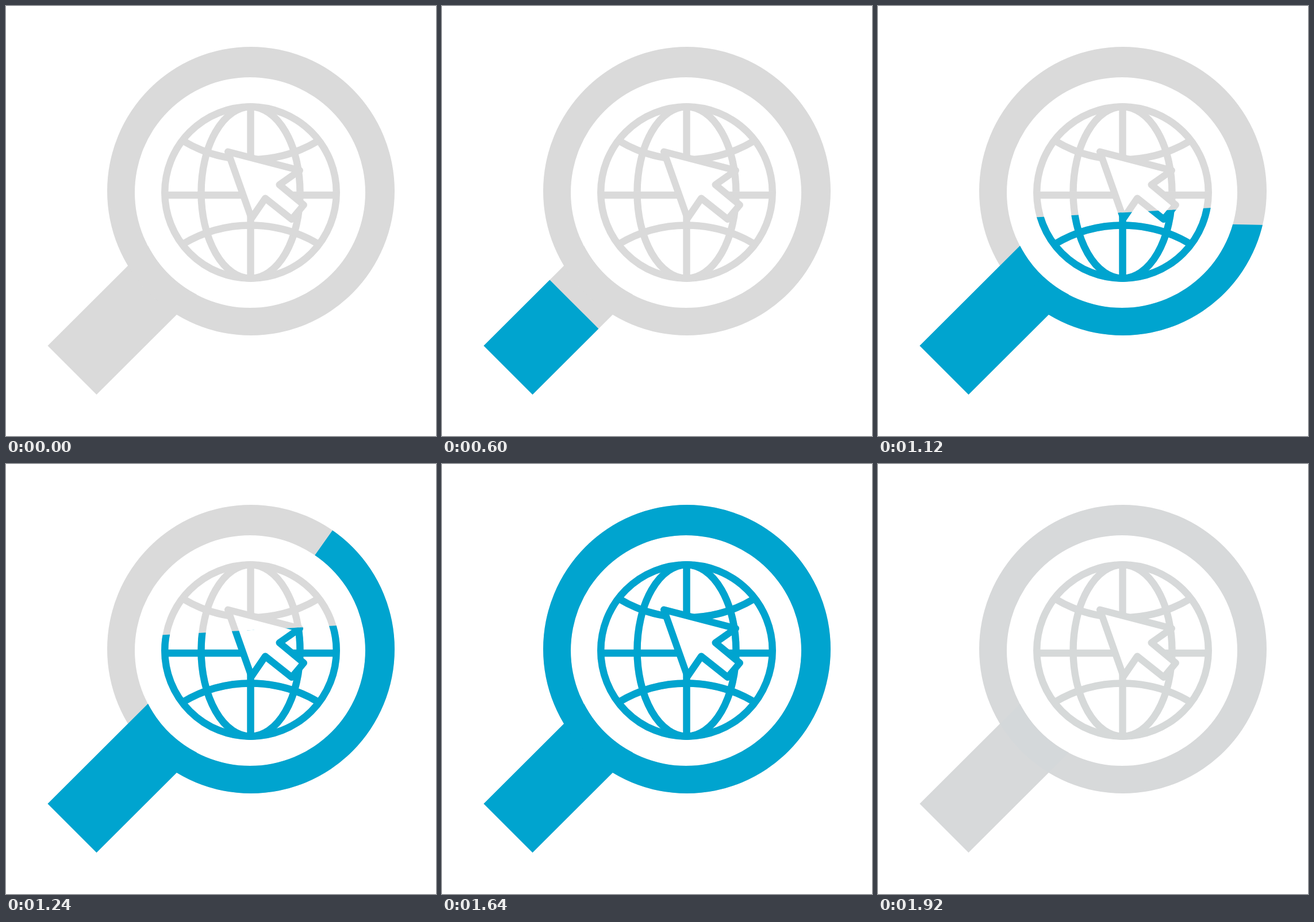
Animation, 748 px wide and 748 px high, one loop 2000 ms. Source, as an HTML page:

```html
<!DOCTYPE html>
<html lang="en">
<head>
<meta charset="utf-8">
<title>Web search</title>
<style>
  html, body { margin: 0; width: 100%; height: 100%; overflow: hidden; background: #fff; }
  svg { display: block; width: 100%; height: 100%; }
  .gray { color: #dadada; }
  .blue { color: #00a4cf; }
</style>
</head>
<body>
<svg viewBox="0 0 748 748">
  <defs>
    <path id="handle" fill="currentColor"
      d="M72.5 591L157.5 676L332 502A200.5 200.5 0 0 1 247 417Z"/>
    <path id="ring" fill="currentColor" fill-rule="evenodd"
      d="M176 322a250 251 0 0 1 500 0a250 251 0 0 1 -500 0Z
         M224 324.5a200.5 200.5 0 0 1 401 0a200.5 200.5 0 0 1 -401 0Z"/>
    <g id="globe" fill="none" stroke="currentColor" stroke-width="12.4">
      <circle cx="425.5" cy="324.5" r="149.3"/>
      <ellipse cx="425.5" cy="324.5" rx="86" ry="149.3"/>
      <path d="M425.5 175V474M276 329H575"/>
      <path d="M307 234A229 229 0 0 0 544 234M307 414.5A229 229 0 0 1 544 414.5"/>
      <path fill="#fff" stroke-width="12" stroke-linejoin="round"
        d="M386 253.5L511 286L475.5 310.8L518 346L497 371L451 334.5L427 369.5Z"/>
    </g>
    <clipPath id="handleClip"><polygon id="handleCut"/></clipPath>
    <clipPath id="ringClip"><polygon id="ringCut"/></clipPath>
    <clipPath id="globeClip"><polygon id="globeCut"/></clipPath>
  </defs>
  <g class="gray">
    <use href="#handle"/><use href="#ring"/><use href="#globe"/>
  </g>
  <g class="blue">
    <g class="fill" clip-path="url(#handleClip)"><use href="#handle"/></g>
    <g class="fill" clip-path="url(#ringClip)"><use href="#ring"/></g>
    <g class="fill" clip-path="url(#globeClip)"><use href="#globe"/></g>
  </g>
</svg>
<script>
const LOOP = 2000, STEP = 40;
const byId = id => document.getElementById(id);
const fills = document.querySelectorAll('.fill');
const clamp = x => Math.min(1, Math.max(0, x));
const span = (t, from, to) => clamp((t - from) / (to - from));
const easeInOut = p => p < 0.5 ? 2 * p * p : 1 - 2 * (1 - p) ** 2;

// Sweep angle of the ring in degrees over time, around a pivot inside the lens
const pivot = [384, 375];
const sweep = [[760, 135], [800, 114.3], [960, 49.4], [1120, 1.2], [1400, -129.2], [1555, -225]];

function sweepAngle(t) {
  let angle = sweep[0][1];
  for (let i = 1; i < sweep.length; i++) {
    const [t0, a0] = sweep[i - 1], [t1, a1] = sweep[i];
    if (t > t0) angle = a0 + (a1 - a0) * span(t, t0, t1);
  }
  return angle;
}

function setCut(id, points) {
  byId(id).setAttribute('points', points.map(p => p.join()).join(' '));
}

function cutHandle(t) {
  const d = 190 * easeInOut(span(t, 400, 760));
  setCut('handleCut', d ? [[62, 581], [167, 686], [167 + d, 686 - d], [62 + d, 581 - d]]
    .map(([x, y], i) => i < 2 ? [x - 10, y + 10] : [x, y]) : []);
}

function cutRing(t) {
  const start = sweep[0][1], end = sweepAngle(t);
  if (end >= start) return setCut('ringCut', []);
  if (end <= start - 360) return setCut('ringCut', [[0, 0], [748, 0], [748, 748], [0, 748]]);
  const points = [pivot], n = Math.ceil((start - end) / 15);
  for (let i = 0; i <= n; i++) {
    const a = (start + (end - start) * i / n) * Math.PI / 180;
    points.push([pivot[0] + 600 * Math.cos(a), pivot[1] + 600 * Math.sin(a)]);
  }
  setCut('ringCut', points);
}

function cutGlobe(t) {
  const level = 359.4 - 0.5854 * (t - 1120);
  const edge = x => [x, level - 0.054 * (x - 425.5)];
  setCut('globeCut', t < 920 ? [] : [edge(260), edge(590), [590, 490], [260, 490]]);
}

function draw(t) {
  cutHandle(t);
  cutRing(t);
  cutGlobe(t);
  const opacity = Math.max(0.01, 1 - span(t, 1655, 1920) ** 3);
  fills.forEach(el => el.setAttribute('opacity', opacity));
}

const begin = performance.now();
function tick() {
  const t = (performance.now() - begin) % LOOP;
  draw(Math.floor(t / STEP) * STEP);
  requestAnimationFrame(tick);
}
tick();
</script>
</body>
</html>
```
